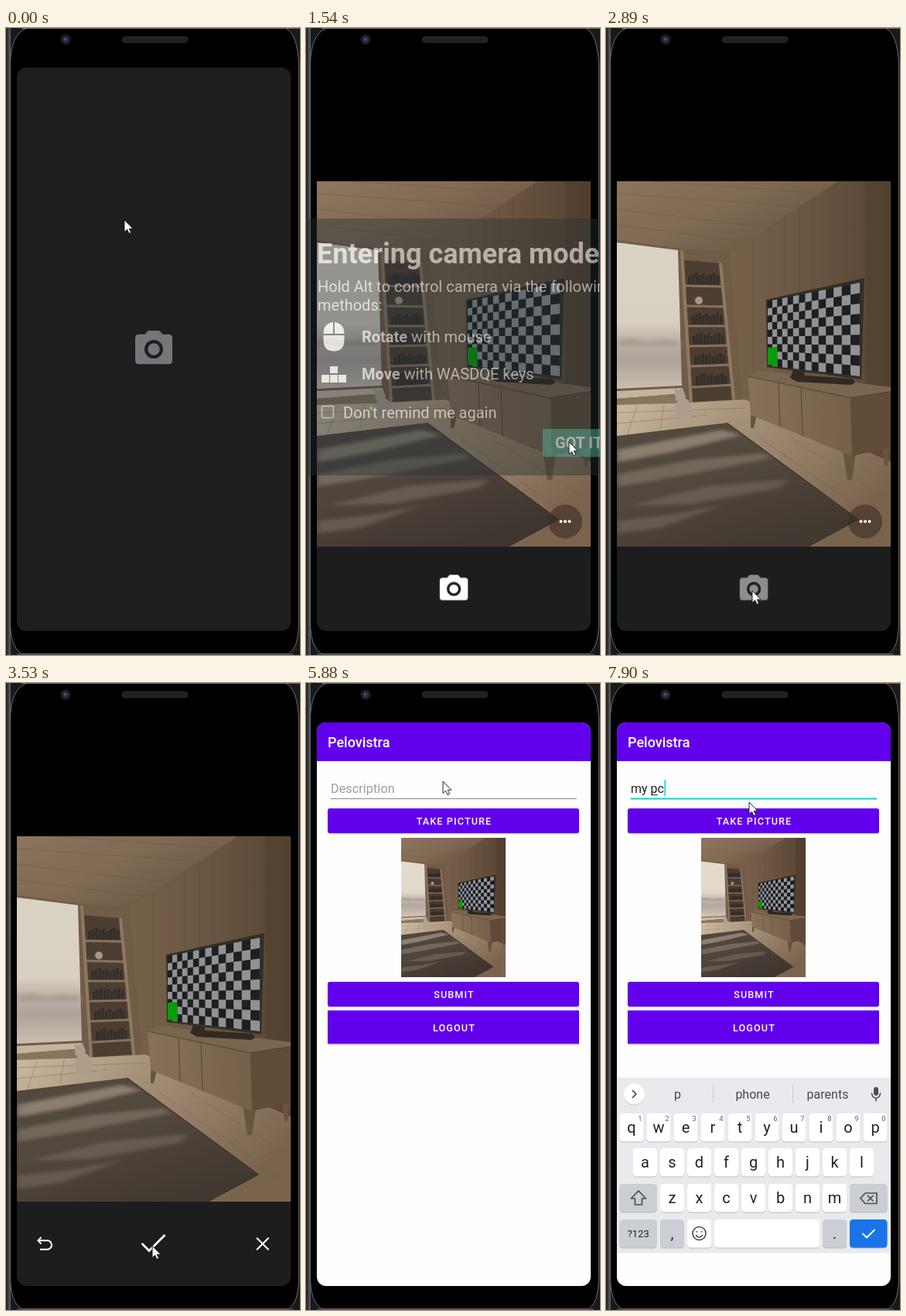
An HTML page for the animation above (8000 ms loop, 380x810 px).

```html
<!DOCTYPE html>
<html lang="en">
<head>
<meta charset="utf-8">
<title>Camera capture demo</title>
<style>
html, body { margin: 0; width: 380px; height: 810px; overflow: hidden; background: #000; }
svg { display: block; }
text { font-family: Roboto, "Noto Sans", sans-serif; }
.btn { font-weight: 500; font-size: 12.6px; letter-spacing: .0892em; fill: #fff; text-anchor: middle; }
.words { font-size: 16px; fill: #45494d; text-anchor: middle; }
.key { font-size: 20px; fill: #202124; text-anchor: middle; }
.num { font-size: 9.5px; fill: #5f6368; text-anchor: middle; }
.dlg text { font-size: 20px; fill: #e2e2e2; }
.line { fill: none; stroke-linecap: round; stroke-linejoin: round; }

#cursor { animation: point 8s infinite step-end; }
#dialog { animation: dialog 8s infinite step-end; }
#camera { animation: camera 8s infinite step-end; transform-origin: 14px 51px; }
#keys { animation: slide 8s infinite step-end; }
#caret { animation: caret 8s infinite step-end; }
#shutter { animation: press 8s infinite step-end; }

@keyframes point {
  0% { transform: translate(153px, 248px); }
  1.875% { transform: translate(153px, 248px); animation-timing-function: steps(3, start); }
  6.94% { transform: translate(145px, 314px); }
  7.125% { transform: translate(145px, 314px); animation-timing-function: steps(5, start); }
  15.4% { transform: translate(351px, 546px); }
  15.625% { transform: translate(340px, 535px); }
  24.375% { transform: translate(340px, 535px); animation-timing-function: steps(5, start); }
  32.3% { transform: translate(190px, 695px); }
  32.625% { transform: translate(189px, 727px); }
  65% { transform: translate(189px, 727px); animation-timing-function: steps(5, start); }
  73.375% { transform: translate(178px, 150px); }
  73.5% { transform: translate(177px, 127px); }
  75% { transform: translate(177px, 127px); animation-timing-function: steps(2, start); }
  78.4%, 100% { transform: translate(185px, 154px); }
}
@keyframes dialog {
  0% { opacity: 0; }
  3.375% { opacity: .5; }
  5.25% { opacity: 1; }
  19.25% { opacity: .65; }
  20.875% { opacity: .4; }
  22.875% { opacity: .2; }
  24.375%, 100% { opacity: 0; }
}
@keyframes camera {
  0% { opacity: 0; transform: none; }
  3.375% { opacity: 1; transform: none; }
  60% { opacity: 1; transform: scale(.9977, .9988); }
  62% { opacity: .55; transform: scale(.96); }
  63.5% { opacity: .15; transform: scale(.92); }
  65%, 100% { opacity: 0; transform: none; }
}
@keyframes press {
  0% { opacity: 1; }
  36.125% { opacity: .5; }
  39.125%, 100% { opacity: 0; }
}
@keyframes slide {
  0% { transform: translateY(270px); }
  76.6% { transform: translateY(270px); animation-timing-function: steps(4, start); }
  83.4%, 100% { transform: none; }
}
@keyframes caret {
  0% { transform: none; }
  87.125% { transform: translateX(14px); }
  89% { transform: translateX(21.5px); }
  92.5% { transform: translateX(25.5px); }
  95.6% { transform: translateX(35px); }
  98.75%, 100% { transform: translateX(44px); }
}
</style>
</head>
<body>
<svg width="380" height="810" viewBox="0 0 380 810">
<defs>
  <linearGradient id="edge"><stop offset="0" stop-color="#1b1e20"/><stop offset=".4" stop-color="#33383a"/><stop offset="1" stop-color="#5f6569"/></linearGradient>
  <linearGradient id="ceil" x2="1" y2=".6"><stop offset="0" stop-color="#8f7660"/><stop offset=".5" stop-color="#826a55"/><stop offset="1" stop-color="#6a5441"/></linearGradient>
  <linearGradient id="wall"><stop offset="0" stop-color="#866e58"/><stop offset=".55" stop-color="#735b47"/><stop offset="1" stop-color="#574332"/></linearGradient>
  <linearGradient id="sky" x2="0" y2="1"><stop offset="0" stop-color="#e4dbce"/><stop offset=".55" stop-color="#e2d9cd"/><stop offset=".66" stop-color="#c6bbb2"/><stop offset=".8" stop-color="#b3a8a2"/><stop offset="1" stop-color="#d2c6b6"/></linearGradient>
  <linearGradient id="floor" x2="1" y2=".6"><stop offset="0" stop-color="#d3c1aa"/><stop offset=".4" stop-color="#ab937a"/><stop offset="1" stop-color="#7c634d"/></linearGradient>
  <linearGradient id="rug" x2=".6" y2="1"><stop offset="0" stop-color="#51463e"/><stop offset=".5" stop-color="#4f453d"/><stop offset="1" stop-color="#3e352f"/></linearGradient>
  <linearGradient id="stand"><stop offset="0" stop-color="#8b725b"/><stop offset="1" stop-color="#775f4a"/></linearGradient>
  <filter id="soft"><feGaussianBlur stdDeviation="4 2"/></filter>
  <clipPath id="rugClip"><path d="M14 527 157 510 327 635 262 670H14z"/></clipPath>
  <clipPath id="screen"><rect x="14" y="51" width="354" height="728" rx="12"/></clipPath>
  <path id="cam" fill-rule="evenodd" d="M9 2 7.2 4H4q-2 0-2 2v12q0 2 2 2h16q2 0 2-2V6q0-2-2-2h-3.2L15 2zM12 7a5 5 0 1 1 0 10 5 5 0 1 1 0-10zM12 8.8a3.2 3.2 0 1 0 0 6.4 3.2 3.2 0 1 0 0-6.4z"/>

  <symbol id="room" viewBox="14 198 354 472" preserveAspectRatio="none">
    <path fill="url(#wall)" d="M14 198H368V670H14z"/>
    <path fill="url(#ceil)" d="M14 198H300L215 253 160 290 98 286 14 276z"/>
    <path class="line" stroke="#5f4a38" stroke-opacity=".35" d="M14 214 250 230M14 234 205 257M14 254 180 276M60 198 275 213"/>
    <path class="line" stroke="#4f3c2d" stroke-opacity=".3" d="M190 272V445M212 257V350M232 243V342M250 232V338M268 220V334M295 202V328"/>
    <path fill="#463527" fill-opacity=".35" d="M335 198H368V466L335 460z"/>
    <path fill="#725b47" d="M14 274 98 285 160 290 176 483 100 486 14 490z"/>
    <path fill="url(#sky)" d="M14 277 93 287 98 462 14 466z"/>
    <path fill="#a59485" fill-opacity=".55" filter="url(#soft)" d="M14 404 30 400 52 405 74 402 96 405 97 411H14z"/>
    <path fill="#cbbba5" d="M14 469 98 465 100 472 14 479z"/>
    <path fill="#8c7660" d="M14 479 102 472 104 483 14 488z"/>
    <path fill="#4a3b30" d="M101 300 149 304 163 480 112 483z"/>
    <path id="books" fill="#302a27"/>
    <path class="line" stroke="#8b735d" stroke-width="3" d="M103 333 152 334M105 359 154 360M107 385 156 385M108 411 159 410M110 437 161 435M112 464 164 461"/>
    <path class="line" stroke="#927a62" stroke-width="4" d="M98 289 110 484M148 305 165 480"/>
    <circle cx="120" cy="352" r="5" fill="#ad9c86"/>
    <path fill="url(#floor)" d="M14 487 108 484 180 480 368 560V670H14z"/>
    <path class="line" stroke="#6e5844" stroke-opacity=".4" d="M14 497 180 491M14 511 130 500M40 488 28 524M75 487 70 518M200 530 368 650M240 530 368 612M270 605 300 590M305 625 345 606M327 645 368 630"/>
    <g clip-path="url(#rugClip)">
      <path fill="url(#rug)" d="M14 500H330V670H14z"/>
      <g fill="#988a7b" filter="url(#soft)">
        <path fill-opacity=".85" d="M14 545 150 519 175 526 80 549 14 561z"/>
        <path fill-opacity=".5" d="M14 577 110 558 205 549 212 556 95 579 14 593z"/>
        <path fill-opacity=".35" d="M30 617 130 592 235 583 225 594 110 615zM14 637 90 628 150 616 70 646 14 653z"/>
      </g>
      <path class="line" stroke="#362c26" stroke-width="2" d="M157 510 327 635 262 670"/>
    </g>
    <g fill="#b3a390">
      <ellipse cx="100" cy="494" rx="11" ry="16"/>
      <path d="M88 465 93 468 99 465 103 476 98 483 90 481zM106 503Q116 506 122 498L125 501Q116 512 104 508z"/>
    </g>
    <path fill="#69533e" d="M187 498 195 500 191 517H187zM306 546 323 549 318 584H312zM357 540 367 538 364 566H360z"/>
    <path fill="#7d6550" d="M183 448 202 443 368 464V470L316 477z"/>
    <path fill="url(#stand)" d="M183 449 316 477 318 553 187 500z"/>
    <path fill="#614a38" d="M316 477 368 469V542L318 553z"/>
    <path class="line" stroke="#54402f" d="M223 459 225 515M252 465 254 527M183 450 316 478 368 470"/>
    <path fill="#2c241e" d="M238 452 242 442 256 444 257 449 318 453Q326 459 316 461L247 457z"/>
    <path fill="#2d2a24" d="M207 351 334 323 330 454 208 438z"/>
    <path fill="#17191c" d="M209 353 328 329 327 450 209 436z"/>
    <path id="checks" fill="#92959a"/>
    <path fill="#00a000" d="M209 413 221 412 222 437 209 435z"/>
  </symbol>
</defs>

<!-- phone body -->
<rect width="380" height="810" fill="#17191b"/>
<rect width="6" height="810" fill="url(#edge)"/>
<path d="M5.500 770V48Q6 8 26 .5H362Q377 8 378.500 48V770Q378 800 366 808.500H20Q6 800 5.500 770z" stroke="#6a6f73"/>
<path d="M20 .5H380M14 809H372" stroke="#6d7375"/>
<circle cx="77" cy="15" r="6.500" fill="#1d1f27"/><circle cx="77" cy="15" r="3.500" fill="#2b3152"/><circle cx="76.500" cy="14.500" r="1.500" fill="#4c5684"/>
<rect x="150" y="11" width="85" height="8" rx="4" fill="#212121" stroke="#303030" stroke-width=".6"/>

<g clip-path="url(#screen)">
  <!-- app -->
  <g data-show="4800 8000">
    <rect x="14" y="51" width="354" height="728" fill="#fefefe"/>
    <g data-show="4960 8000">
      <rect x="14" y="51" width="354" height="50" fill="#6200ee"/>
      <text x="28" y="83" font-size="18" font-weight="500" fill="#fff">Pelovistra</text>
    </g>
    <text x="32" y="142" font-size="16" letter-spacing=".15" fill="#9b9b9b" data-show="4800 6970">Description</text>
    <path d="M32 149.500H350" stroke="#8b8b8b" data-show="4800 6130"/>
    <path d="M32 149.500H350" stroke="#03dac5" stroke-width="2" data-show="6130 8000"/>
    <text x="32" y="142" font-size="16" fill="#212121"><tspan data-show="6970 8000">m</tspan><tspan data-show="7120 8000">y </tspan><tspan data-show="7650 8000">p</tspan><tspan data-show="7900 8000">c</tspan></text>
    <path d="M32 144.500H46" stroke="#333" data-show="6970 7400"/>
    <path d="M46 144.500H53" stroke="#333" data-show="7120 7400"/>
    <path d="M58 144.500H67" stroke="#333" data-show="7650 8000"/>
    <g data-show="6130 8000"><rect id="caret" x="31.500" y="125" width="1.700" height="21" fill="#03dac5"/></g>
    <g fill="#6200ee">
      <rect x="28" y="163" width="325" height="32.500" rx="3" fill="#000" opacity=".18"/>
      <rect x="28" y="387" width="325" height="32.500" rx="3" fill="#000" opacity=".18"/>
      <rect x="28" y="424" width="325" height="44" fill="#000" opacity=".18"/>
      <rect x="28" y="162" width="325" height="32" rx="3"/>
      <rect x="28" y="386" width="325" height="32" rx="3"/>
      <rect x="28" y="423" width="325" height="43"/>
    </g>
    <text class="btn" x="191.500" y="183">TAKE PICTURE</text>
    <text class="btn" x="191.500" y="406.500">SUBMIT</text>
    <text class="btn" x="191.500" y="450">LOGOUT</text>
    <use href="#room" x="123" y="200" width="135" height="180"/>

    <!-- keyboard -->
    <g id="keys">
      <rect x="14" y="510" width="354" height="226.500" fill="#e8eaed"/>
      <circle cx="36.500" cy="532" r="13.500" fill="#c9ccd0"/><circle cx="36.500" cy="531" r="13.500" fill="#fff"/>
      <path class="line" stroke="#5f6368" stroke-width="1.800" d="M34.500 526.500 39 531 34.500 535.500"/>
      <path stroke="#cbced2" d="M138.500 520V542M241.500 520V542"/>
      <rect x="346" y="522" width="6" height="11" rx="3" fill="#4b4f53"/>
      <path class="line" stroke="#4b4f53" stroke-width="1.600" d="M343.500 530Q344 536 349 536T354.500 530M349 536V540"/>
      <g id="caps"></g>
      <g class="line" stroke="#4b4f53" stroke-width="1.700">
        <path d="M42 656 51.500 666H46.500V674H37.500V666H32.500z"/>
        <path d="M335 659H350V672.500H335L329 665.700zM338.500 662.500 345 669M345 662.500 338.500 669"/>
        <circle cx="120.500" cy="711" r="8.500"/>
        <path d="M116.500 713.500Q120.500 719 124.500 713.500M117.500 708.500V709M123.500 708.500V709"/>
        <path stroke="#fff" stroke-width="2" d="M332 711.500 337 716.500 347 706.500"/>
      </g>
      <g id="hints"></g>
    </g>
  </g>

  <!-- camera -->
  <rect x="14" y="51" width="354" height="728" fill="#1e1e1e" data-show="0 270"/>
  <use href="#cam" fill="#75757a" transform="translate(162.200 386.200) scale(2.4)" data-show="0 270"/>
  <g id="camera"><g clip-path="url(#screen)">
    <rect x="14" y="51" width="354" height="728"/>
    <use href="#room" x="14" y="198" width="354" height="472"/>
    <rect x="14" y="198" width="354" height="472" fill="#6b6a50" opacity=".08" data-show="2890 5200"/>
    <rect x="14" y="670" width="354" height="109" fill="#1d1d1d"/>
    <g data-show="270 3010">
      <circle cx="335" cy="637.500" r="22" fill="#3b2d24" opacity=".6"/>
      <g fill="#fff"><circle cx="329.500" cy="637.500" r="2"/><circle cx="335" cy="637.500" r="2"/><circle cx="340.500" cy="637.500" r="2"/></g>
    </g>
    <g id="shutter"><use href="#cam" fill="#fff" transform="translate(169.200 702.800) scale(1.820)"/></g>
    <g fill="none" stroke="#fff" stroke-width="2" data-show="3530 5200">
      <path d="M45.500 716 41.500 720.300 45.500 724.600M41.500 720.300H53.500A5.500 5.700 0 0 1 53.500 731.700H44"/>
      <path stroke-width="2.800" d="M175.500 724 185 733.500 205.500 713"/>
      <path d="M324 716.800 339.500 732.300M339.500 716.800 324 732.300"/>
    </g>
  </g></g>
</g>

<!-- help dialog -->
<g id="dialog" class="dlg">
  <rect y="246" width="380" height="332" fill="#263238" opacity=".64"/>
  <text x="14" y="304" style="font-size:36px" font-weight="700">Entering camera mode</text>
  <text x="15" y="341">Hold Alt to control camera via the following</text>
  <text x="15" y="364.500">methods:</text>
  <text x="72" y="406"><tspan font-weight="700">Rotate</tspan> with mouse</text>
  <text x="72" y="454"><tspan font-weight="700">Move</tspan> with WASDQE keys</text>
  <text x="48" y="504">Don't remind me again</text>
  <g fill="#fff">
    <path d="M35 380V395H22.500Q22.500 382 35 380zM37 380Q49.500 382 49.500 395H37zM22.500 397H49.500V403Q49.500 417.500 36 417.500T22.500 403z"/>
    <path d="M31 437H41V446H31zM20 448H30V458H20zM31 448H41V458H31zM42 448H52V458H42z"/>
  </g>
  <rect x="20.500" y="488.500" width="15" height="15" rx="1" fill="none" stroke="#c4c8ca" stroke-width="1.600"/>
  <rect x="306" y="518" width="90" height="36" rx="2" fill="#438f81"/>
  <text x="322" y="543" font-weight="700">GOT IT</text>
</g>

<path id="cursor" d="M0 0V15.500L3.600 12.200 6 17.500 8.600 16.300 6.200 11.200H11z" fill="#fff" stroke="#111" stroke-width=".9"/>
</svg>

<script>
const $ = id => document.getElementById(id);

// perspective checkerboard on the TV
const near = { x: 328, top: 329, h: 121 }, far = { x: 209, top: 353, h: 83 };
function at(u, v) {
  const a = (1 - u) / far.h, b = u / near.h;
  const mix = (p, q) => ((a * p + b * q) / (a + b)).toFixed(1);
  return mix(far.x, near.x) + " " + mix(far.top + v * far.h, near.top + v * near.h);
}
let d = "";
const cols = 14, rows = 9;
for (let i = 0; i < cols; i++) for (let j = 0; j < rows; j++) {
  if ((i + j) % 2 === 0) continue;
  const u = i / cols, v = j / rows, U = (i + 1) / cols, V = (j + 1) / rows;
  d += `M${at(u, v)} ${at(U, v)} ${at(U, V)} ${at(u, V)}z`;
}
$("checks").setAttribute("d", d);

// books on the ladder shelf
d = "";
for (let s = 0; s < 6; s++) {
  if (s === 1) continue;
  for (let b = 0; b < 9; b++) {
    const h = 12 + (b * 7 + s * 5) % 5;
    d += `M${106 + s * 2 + b * 4.6} ${332 + s * 26}v${-h}h3.700v${h}z`;
  }
}
$("books").setAttribute("d", d);

// keyboard
let caps = "";
function key(x, y, w, label = "", fill = "#fff", size = 20) {
  caps += `<rect x="${x}" y="${y + 1}" width="${w}" height="36.500" rx="4.500" fill="#b9bcc1"/>
    <rect x="${x}" y="${y}" width="${w}" height="36.500" rx="4.500" fill="${fill}"/>
    <text class="key" x="${x + w / 2}" y="${y + (size < 20 ? 23 : 24.500)}" style="font-size:${size}px">${label}</text>`;
}
const grey = "#cbced4";
[["qwertyuiop", 17.5, 556], ["asdfghjkl", 35, 601], ["zxcvbnm", 70, 647]].forEach(([row, x, y]) =>
  [...row].forEach((c, i) => key(x + i * 35, y, 31, c)));
for (let i = 0; i < 10; i++) caps += `<text class="num" x="${44 + i * 35}" y="566">${(i + 1) % 10}</text>`;
key(17.5, 647, 48.5, "", grey);
key(315, 647, 48.5, "", grey);
key(17.5, 693, 48.5, "?123", grey, 13);
key(70, 693, 31, ",", grey);
key(105, 693, 31);
key(140, 693, 136);
key(280, 693, 31, ".", grey);
key(315, 693, 48.5, "", "#1a73e8");
$("caps").innerHTML = caps;

// word suggestions while typing
$("hints").innerHTML = [
  [4800, 6970, "I", "The", "I'm"],
  [6970, 7120, "m", "my", "maybe"],
  [7120, 7400, "my", "My", "myself"],
  [7400, 7650, "phone", "mom", "friend"],
  [7650, 8000, "p", "phone", "parents"]
].map(([from, to, ...words]) => `<g class="words" data-show="${from} ${to}">` +
  words.map((w, i) => `<text x="${92.5 + i * 97}" y="537">${w}</text>`).join("") + "</g>").join("");

// data-show="from to" in ms becomes a visibility window
const sheet = document.createElement("style");
document.querySelectorAll("[data-show]").forEach((el, i) => {
  const [from, to] = el.dataset.show.split(" ").map(ms => ms / 80);
  sheet.textContent += `@keyframes show${i} { 0% { visibility: hidden } ${from}% { visibility: visible }
    ${to}%, 100% { visibility: hidden } }\n`;
  el.style.animation = `show${i} 8s infinite step-end`;
});
document.head.append(sheet);
</script>
</body>
</html>
```
